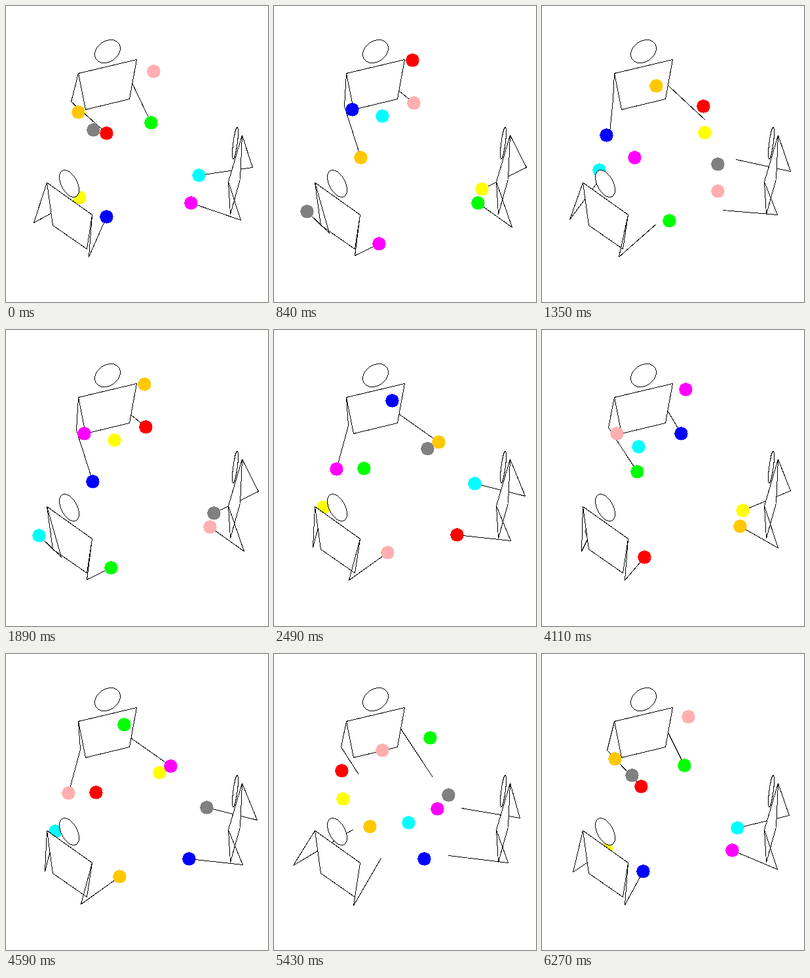
Animation of 400x450 px, one loop 6.3 s. Source, as an HTML page:

```html
<!DOCTYPE html>
<html lang="en">
<head>
<meta charset="utf-8">
<title>Three jugglers passing nine balls</title>
<style>
  html, body { margin: 0; width: 100%; height: 100%; overflow: hidden; background: #fff; }
  svg { display: block; width: 400px; height: 450px; shape-rendering: crispEdges; }
  .line { fill: none; stroke: #000; }
  .body { fill: #fff; stroke: #000; }
</style>
</head>
<body>
<svg id="stage" viewBox="0 0 400 450"></svg>
<script>
const PERIOD = 1050, STEP = 30, LOOP = 6 * PERIOD;
const CATCH = 370, SWING = 840;  // phases; every throw is at phase 0
const FALL = [0, 0.000199];      // half of gravity, px per ms²
const POSES = [0, 390, SWING];   // phases of the three elbow poses

const mod = (a, n) => ((a % n) + n) % n;
const each = f => [0, 1].map(f);

function hermite(t, t0, p, v, t1, q, w) {
  const d = t1 - t0, s = (t - t0) / d, r = 1 - s;
  return each(i => r * r * ((1 + 2 * s) * p[i] + s * d * v[i]) + s * s * ((1 + 2 * r) * q[i] - r * d * w[i]));
}

// The one sine wave with the loop's period that passes through three points.
function wave(points, t) {
  const gap = (a, b) => Math.sin((a - b) * Math.PI / PERIOD);
  const weights = POSES.map(own => POSES.filter(p => p !== own)
    .reduce((w, p) => w * gap(t, p) / gap(own, p), 1));
  return each(i => points.reduce((sum, p, k) => sum + p[i] * weights[k], 0));
}

// laps: whole periods a ball stays up before the catch; elbow: three poses
const hands = {
  a1: { shoulder: [110, 102], release: [153, 193], caught: [95, 209], swing: [132, 230],
        to: 'b1', laps: 1, elbow: [[99, 145], [113, 145], [107, 152]] },
  b1: { shoulder: [199, 81], release: [221, 177], caught: [251, 170], swing: [213, 147],
        to: 'a3', laps: 0, elbow: [[184, 100], [177, 118], [175, 116]] },
  a3: { shoulder: [339, 267], release: [282, 299], caught: [279, 311], swing: [311, 299],
        to: 'b2', laps: 0, elbow: [[358, 325], [361, 320], [363, 336]] },
  b2: { shoulder: [131, 317], release: [153, 320], caught: [174, 337], swing: [160, 361],
        to: 'a1', laps: 1, elbow: [[126, 381], [114, 380], [123, 379]] },
  a2: { shoulder: [62, 268], release: [112, 291], caught: [76, 268], swing: [50, 312],
        to: 'b3', laps: 0, elbow: [[42, 329], [59, 330], [84, 345]] },
  b3: { shoulder: [360, 196], release: [294, 257], caught: [304, 233], swing: [317, 278],
        to: 'a2', laps: 1, elbow: [[376, 245], [383, 252], [385, 245]] }
};

for (const h of Object.values(hands)) {
  h.air = h.laps * PERIOD + CATCH;
  h.speed = each(i => (hands[h.to].caught[i] - h.release[i]) / h.air - FALL[i] * h.air);
  // hand velocity at the catch that leads it through its swing point
  const path = v => hermite(SWING, CATCH, h.caught, v, PERIOD, h.release, h.speed);
  const still = path([0, 0]), moved = path([1, 1]);
  h.drift = each(i => (h.swing[i] - still[i]) / (moved[i] - still[i]));
}

const flight = (h, t) => each(i => h.release[i] + h.speed[i] * t + FALL[i] * t * t);

const handAt = (h, phase) => phase < CATCH
  ? hermite(phase, 0, h.release, h.speed, CATCH, h.caught, h.drift)
  : hermite(phase, CATCH, h.caught, h.drift, PERIOD, h.release, h.speed);

// Follow a ball that leaves the given hand at time 0.
function ballAt(start, t) {
  let h = hands[start];
  while (t >= (h.laps + 1) * PERIOD) {
    t -= (h.laps + 1) * PERIOD;
    h = hands[h.to];
  }
  return t < h.air ? flight(h, t) : handAt(hands[h.to], t % PERIOD);
}

const stage = document.getElementById('stage');
function add(parent, name, attrs = {}) {
  const el = document.createElementNS('http://www.w3.org/2000/svg', name);
  for (const k in attrs) el.setAttribute(k, attrs[k]);
  return parent.appendChild(el);
}
// Shifted by half a pixel so that whole coordinates are pixel centres.
const layer = () => add(stage, 'g', { transform: 'translate(.5 .5)' });

function addArm(parent, id) {
  hands[id].line = add(parent, 'polyline', { class: 'line' });
}
function addBody(parent, torso, x, y, rx, ry, turn) {
  add(parent, 'polygon', { class: 'body', points: torso });
  add(parent, 'ellipse', { class: 'body', rx, ry, transform: `translate(${x} ${y}) rotate(${turn})` });
}
function addBalls(parent, colors, start, firstDelay) {
  return colors.map((fill, i) => ({
    dot: add(parent, 'circle', { r: 10.2, fill }),
    start, span: colors.length * PERIOD, delay: firstDelay + i * PERIOD
  }));
}

const back = layer(), reach = layer(), middle = layer(), front = layer();
addArm(back, 'b1');
addArm(back, 'b3');
addBody(back, '110,102 199,81 188,141 121,157', 154.5, 68.5, 21, 15.7, -34);
addArm(back, 'a1');
addArm(reach, 'a2');
addBody(middle, '62,268 131,317 123,369 71,333', 96, 269.5, 22.3, 12.2, 62);
addBody(front, '360,196 339,267 342,316 357,263', 349.5, 208, 3.2, 24, 7.5);
addArm(front, 'a3');
addArm(front, 'b2');

const balls = [
  ...addBalls(reach, ['#808080', '#00ffff', '#ffff00'], 'b3', -PERIOD),
  ...addBalls(front, ['#ff0000', '#ffc800', '#0000ff', '#ff00ff', '#00ff00', '#ffafaf'], 'a1', 0)
];

function draw(time) {
  const t = Math.floor(mod(time, LOOP) / STEP) * STEP, phase = t % PERIOD;
  for (const h of Object.values(hands)) {
    const points = [h.shoulder, wave(h.elbow, phase), handAt(h, phase)];
    h.line.setAttribute('points', points.map(p => p.map(Math.round)).join(' '));
  }
  for (const b of balls) {
    const [x, y] = ballAt(b.start, mod(t - b.delay, b.span)).map(Math.round);
    b.dot.setAttribute('cx', x);
    b.dot.setAttribute('cy', y);
  }
  // the second juggler's arm swings round from behind the torso
  const under = phase > 600 && phase < 900 ? middle : back;
  if (under.nextSibling !== reach) stage.insertBefore(reach, under.nextSibling);
}

const begin = performance.now();
function tick() {
  draw(performance.now() - begin);
  requestAnimationFrame(tick);
}
draw(0);
requestAnimationFrame(tick);
</script>
</body>
</html>
```
